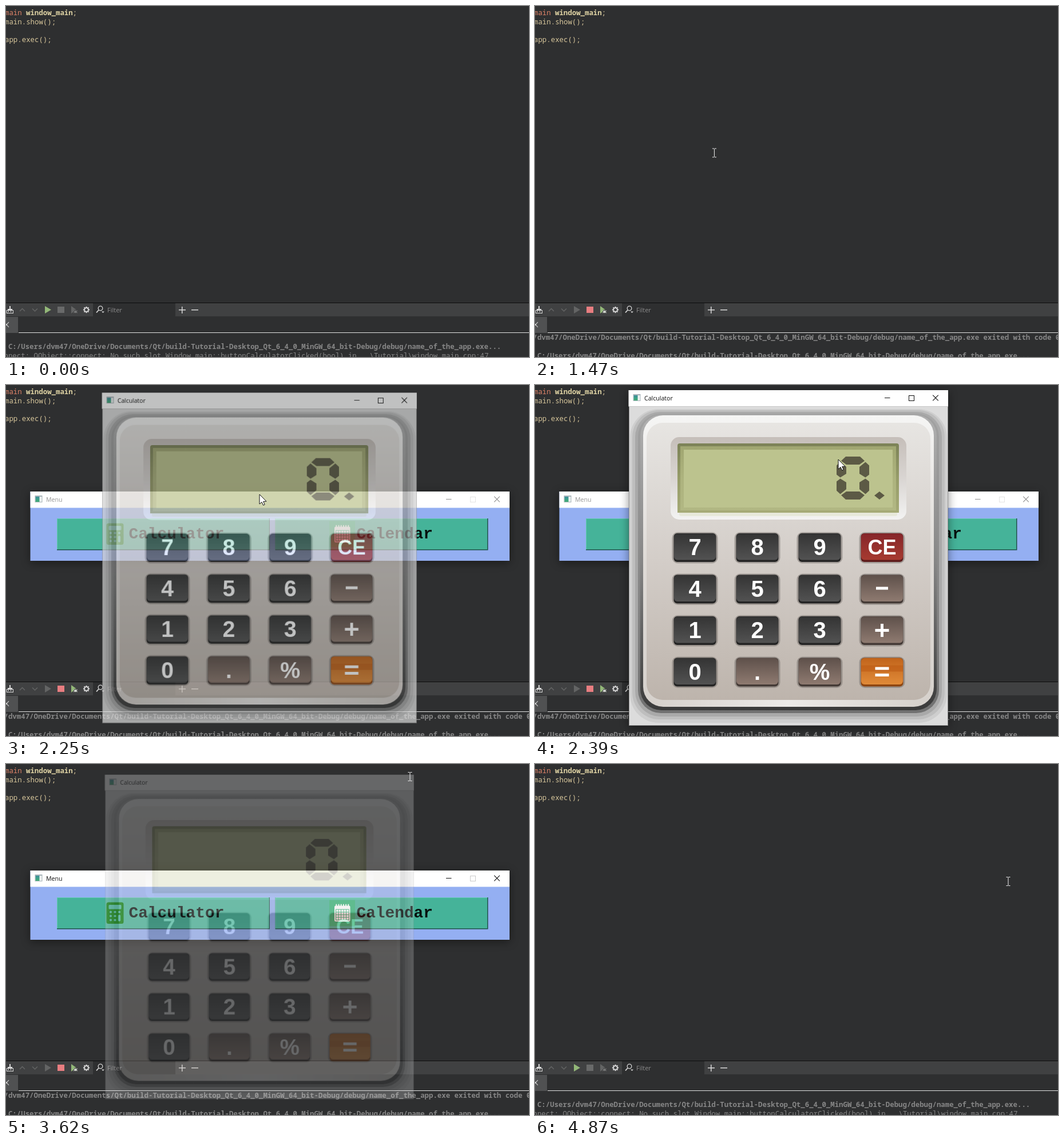
Recreate the animation shown at these times as an HTML page with a canvas. Size 914 by 613 pixels, loop 5 s.

```html
<!DOCTYPE html>
<html lang="en">
<head>
<meta charset="utf-8">
<title>Menu and calculator</title>
<style>
html, body { margin: 0; width: 100%; height: 100%; overflow: hidden; background: #2e2f30; }
canvas { display: block; }
</style>
</head>
<body>
<canvas id="stage" width="914" height="613"></canvas>
<script>
const W = 914, H = 613, LOOP = 5000;
const screen = document.getElementById('stage').getContext('2d');
const buffer = document.createElement('canvas');
buffer.width = W;
buffer.height = H;
const layer = buffer.getContext('2d');
let g = screen;

const MONO = '12.38px "Noto Sans Mono", monospace';
const UI = '"Open Sans", "Noto Sans", sans-serif';
const CHAR = 7.43;

// Bursts of motion: start time and step length
const BURSTS = [[0, 120], [120, 90], [1260, 71], [1830, 70], [2390, 70], [3280, 68], [3830, 70], [4520, 70]];

// time, x, y
const POINTER = [
  [120, 136, 546], [390, 222, 536], [1259, 222, 536], [1260, 293, 276], [1420, 316, 254],
  [1830, 325, 249], [2010, 327, 248], [2250, 443, 191], [2390, 530, 130], [2880, 709, 15],
  [3280, 709, 15], [3620, 706, 22], [3756, 708, 44], [3830, 716, 62], [4320, 861, 201],
  [4520, 861, 201], [4870, 827, 205]
];

// time, scale, opacity
const MENU_FADE = [
  [1402, .93, 0], [1473, .962, .35], [1544, .985, .7], [1615, .997, .93], [1686, 1, 1],
  [4520, 1, 1], [4590, .995, .85], [4660, .983, .55], [4730, .967, .27], [4800, .953, .08], [4870, .94, 0]
];
const CALC_FADE = [
  [2110, .93, 0], [2180, .962, .38], [2250, .985, .7], [2320, .997, .93], [2390, 1, 1],
  [3416, 1, 1], [3484, .993, .82], [3552, .982, .53], [3620, .967, .27], [3688, .953, .08], [3756, .94, 0]
];

function sample(keys, t) {
  if (t <= keys[0][0]) return keys[0].slice(1);
  for (let i = 1; i < keys.length; i++) {
    const a = keys[i - 1], b = keys[i];
    if (t <= b[0]) {
      const u = (t - a[0]) / (b[0] - a[0]);
      return a.slice(1).map((v, k) => v + (b[k + 1] - v) * u);
    }
  }
  return keys[keys.length - 1].slice(1);
}

function stepTime(t) {
  const [start, step] = BURSTS.filter(b => b[0] <= t).pop();
  return start + Math.floor((t - start) / step) * step;
}

function rect(x, y, x2, y2, color) {
  g.fillStyle = color;
  g.fillRect(x, y, x2 - x, y2 - y);
}

function round(x, y, x2, y2, r, color) {
  g.fillStyle = color;
  g.beginPath();
  g.roundRect(x, y, x2 - x, y2 - y, r);
  g.fill();
}

function box(x, y, x2, y2, color) {
  g.strokeStyle = color;
  g.lineWidth = 1;
  g.strokeRect(x + .5, y + .5, x2 - x - 1, y2 - y - 1);
}

function disc(x, y, r, color) {
  g.fillStyle = color;
  g.beginPath();
  g.arc(x, y, r, 0, 7);
  g.fill();
}

function poly(points, color) {
  g.fillStyle = color;
  g.beginPath();
  points.forEach(p => g.lineTo(...p));
  g.closePath();
  g.fill();
}

function line(points, color, width = 1) {
  g.strokeStyle = color;
  g.lineWidth = width;
  g.beginPath();
  points.forEach((p, i) => i ? g.lineTo(...p) : g.moveTo(...p));
  g.stroke();
}

function text(str, x, y, font, color, align = 'left') {
  g.font = font;
  g.fillStyle = color;
  g.textAlign = align;
  g.fillText(str, x, y);
}

function grad(y, y2, ...colors) {
  const fill = g.createLinearGradient(0, y, 0, y2);
  colors.forEach((c, i) => fill.addColorStop(i / (colors.length - 1), c));
  return fill;
}

// ---- Code editor and output pane ----

function editor() {
  rect(0, 0, W, H, '#2e2f30');
  text('main', -2, 16, MONO, '#e08468');
  text('window_main', 35, 16, 'bold ' + MONO, '#dfd3a4');
  text(';', 35 + 11 * 7.4, 16, MONO, '#d6c59a');
  text('main.show();', -2, 32, MONO, '#d6c59a');
  text('app.exec();', -2, 63, MONO, '#d6c59a');
}

function toolbar(running) {
  const dim = '#636464', green = '#93b878', light = '#d8d8d8';
  rect(0, 518, W, 519, '#0c0c0c');
  rect(0, 519, W, 542, '#404142');
  rect(152, 519, 296, 542, '#2e2f30');

  rect(6, 524, 8, 530, light);
  rect(3, 529, 11, 531, light);
  box(1, 531, 13, 537, light);
  rect(4, 532, 5, 535, light);
  rect(8, 532, 9, 535, light);
  line([[24, 533], [28.5, 528.5], [33, 533]], dim, 1.5);
  line([[46, 528.5], [50.5, 533], [55, 528.5]], dim, 1.5);

  poly([[68, 524], [79, 530.5], [68, 537]], running ? dim : green);
  rect(90, 525, 102, 536, running ? '#e87d80' : '#696a6a');
  poly([[114, 524], [123, 530.5], [114, 537]], running ? green : dim);
  disc(121.5, 534, 3.5, '#404142');
  disc(121.5, 534, 2.3, running ? '#cfd2cc' : '#747575');
  line([[118, 532], [125, 536]], running ? '#cfd2cc' : '#747575');
  line([[118, 536], [125, 532]], running ? '#cfd2cc' : '#747575');

  for (let i = 0; i < 8; i++) {
    const c = Math.cos(i * Math.PI / 4), s = Math.sin(i * Math.PI / 4);
    line([[140.5 + 3.5 * c, 530.5 + 3.5 * s], [140.5 + 5.6 * c, 530.5 + 5.6 * s]], light, 2);
  }
  g.strokeStyle = light;
  g.lineWidth = 1.8;
  g.beginPath();
  g.arc(140.5, 530.5, 3.4, 0, 7);
  g.stroke();

  g.lineWidth = 1.3;
  g.beginPath();
  g.arc(165, 528, 3.8, 0, 7);
  g.stroke();
  line([[162, 531], [158, 535.5]], light, 1.8);
  poly([[167, 533.5], [172, 533.5], [169.5, 536]], light);
  text('Filter', 177, 535, '11px ' + UI, '#8c8c8c');
  rect(302, 530, 314, 531.5, light);
  rect(307, 525, 308.5, 537, light);
  rect(324, 530, 336, 531.5, light);

  rect(0, 543, 21, 571, '#505152');
  line([[-3, 552], [5, 561]], light, 1.1);
  line([[5, 552], [-3, 561]], light, 1.1);
  rect(22, 570, W, 571, '#e2e2e2');
}

function output(state) {
  const gray = '#868686', bold = 'bold ' + MONO, left = -3.5;
  const tail = 'dvm47/OneDrive/Documents/Qt/build-Tutorial-Desktop_Qt_6_4_0_MinGW_64_bit-Debug/debug/name_of_the_app.exe';
  const started = y => text('C:/Users/' + tail + '...', left + CHAR, y, bold, gray);
  const exited = y => text('/' + tail + ' exited with code 0', left, y, bold, gray);
  const warning = y => {
    text('nnect: QObject::connect: No such slot Window_main::buttonCalculatorClicked(bool) in ', left, y, MONO, gray);
    const x = left + 84 * CHAR;
    text('..\\Tutorial\\window_main.cpp:47', x, y, MONO, gray);
    rect(x, y + 1, x + 30 * CHAR, y + 2, gray);
  };
  if (state === 0) { started(599); warning(615); }
  if (state === 1) { warning(583); exited(599); }
  if (state === 2) { exited(583); started(615); }
}

// ---- Application windows ----

function titleBar(x, y, x2, title, o) {
  const mid = y + 13.5, ink = o.active ? '#111' : '#8e8e8e';
  rect(x, y, x2, y + 28.5, '#fff');
  rect(x + 8, y + 7, x + 21, y + 19, '#a9b4ba');
  rect(x + 9, y + 9, x + 20, y + 18, '#eef3f2');
  rect(x + 9, y + 9, x + 16, y + 18, grad(y + 9, y + 18, '#3c8f9c', '#3fae74'));
  text(title, x + 27.5, y + 17.8, '10.6px ' + UI, o.active ? '#111' : '#959595');
  if (o.closing) return;
  rect(x2 - 111, mid - .5, x2 - 101.5, mid + .5, ink);
  box(x2 - 69, mid - 4.5, x2 - 59, mid + 5.5, o.canMax ? ink : o.active ? '#cacaca' : '#e4e4e4');
  if (o.hot) rect(x2 - 42, y, x2, y + 28, '#e81123');
  const cross = o.hot ? '#fff' : ink, cx = x2 - 22, r = 4.8;
  line([[cx - r, mid - r], [cx + r, mid + r]], cross, 1.1);
  line([[cx - r, mid + r], [cx + r, mid - r]], cross, 1.1);
}

function menuButton(x, label, labelX) {
  const x2 = x + 372;
  rect(x, 233, x2, 288.5, '#1d5548');
  rect(x, 233, x2 - 1.5, 287, '#62c9b2');
  rect(x + 1, 234, x2 - 1.5, 287, '#45b399');
  text(label, labelX, 268, 'bold 27.8px "Liberation Mono", monospace', '#07110e');
}

function menu(o) {
  rect(42.5, 186, 880, 307, '#94aff2');
  titleBar(42.5, 186, 880, 'Menu', o);
  menuButton(89, 'Calculator', 214.5);
  menuButton(470.5, 'Calendar', 612.5);

  round(175.5, 241.5, 205.5, 279, 3.5, '#067a0b');
  round(179.5, 246, 201.5, 253.5, 1.5, '#45b399');
  for (let i = 0; i < 9; i++) disc(183 + i % 3 * 7.5, 258.5 + Math.floor(i / 3) * 7, 2.1, '#45b399');
  round(195.9, 263.5, 200.1, 274.6, 2, '#45b399');

  rect(565, 237.5, 610, 283, '#34b478');
  round(574, 247.5, 601.5, 275, 2, '#fff');
  for (let i = 0; i < 6; i++) round(576.3 + i * 4.2, 244.5, 578.3 + i * 4.2, 250, 1, '#fff');
  rect(576, 253.5, 599.5, 273, '#34b478');
  for (let i = 0; i < 20; i++) {
    const x = 577 + i % 5 * 4.5, y = 254.5 + Math.floor(i / 5) * 4.6;
    rect(x, y, x + 3.6, y + 3.7, '#fff');
  }
}

function zeroDigit(ink) {
  const cx = 555.5, cy = 162.5;
  for (const s of [-1, 1]) {
    const py = v => cy + s * v;
    poly([[535, py(30)], [543, py(37.5)], [568, py(37.5)], [576, py(30)], [567, py(23.5)], [544, py(23.5)]], ink);
    for (const d of [-1, 1]) {
      const px = v => cx + d * v;
      poly([[px(22), py(28)], [px(28.5), py(22)], [px(28.5), py(6)], [px(22), py(1)], [px(11.5), py(7.5)], [px(11.5), py(19.5)]], ink);
    }
  }
  poly([[593, 193], [602, 186], [611, 193], [602, 200]], ink);
}

const KEY_COLORS = {
  dark: ['#343434', '#525252', '#242424'],
  brown: ['#5f514b', '#8e7a70', '#443a36'],
  red: ['#86262a', '#a63a30', '#5d1b1b'],
  orange: ['#c2651c', '#e08a38', '#8e4510']
};

function key(label, col, row) {
  const cx = 279.5 + col * 109, cy = 284 + row * 72.5;
  const kind = label === 'CE' ? 'red' : label === '=' ? 'orange' : /\d/.test(label) ? 'dark' : 'brown';
  const [top, bottom, edge] = KEY_COLORS[kind];
  round(cx - 40, cy - 27, cx + 40, cy + 27.5, 10, 'rgba(105,98,94,.45)');
  round(cx - 37, cy - 25, cx + 37, cy + 25, 6, edge);
  round(cx - 36.5, cy - 24.5, cx + 36.5, cy + 21.5, 6, grad(cy - 24, cy + 21, top, bottom));
  if (kind === 'orange') rect(cx - 36.5, cy - 12, cx + 36.5, cy - 1, 'rgba(190,92,20,.6)');
  const bar = (y, h = 5) => rect(cx - 12, y, cx + 12, y + h, '#fff');
  if (label === '-') rect(cx - 10.5, cy - 4, cx + 10.5, cy + 1, '#fff');
  else if (label === '+') {
    bar(cy - 3);
    rect(cx - 2.5, cy - 12, cx + 2.5, cy + 11, '#fff');
  } else if (label === '=') {
    bar(cy - 9);
    bar(cy + 2.5);
  } else {
    const size = label === 'CE' ? 36 : 40;
    text(label, cx, cy + (size === 36 ? 11.5 : 13), `bold ${size}px "Liberation Sans", sans-serif`, '#fff', 'center');
  }
}

function calculator(o) {
  rect(164, 9, 722, 595, '#8f8f8f');
  rect(165, 38, 721, 594, '#dcdcdc');
  titleBar(163.5, 9, 722, 'Calculator', o);

  round(166, 42, 720, 590, 50, '#cecece');
  round(170, 44, 716, 584, 47, '#bebebe');
  round(175, 47, 711, 579, 44, '#a9a9a9');
  round(180, 50, 706, 573, 40, grad(50, 573, '#a2a2a2', '#8a8a8a', '#717171'));
  round(184, 52, 702, 568, 37, grad(52, 568, '#b0b0b0', '#858585', '#3a3a3a'));
  round(189, 53, 697, 562, 35, grad(53, 562, '#f5f5f4', '#dedad6', '#d6d1cc'));
  const gleam = g.createLinearGradient(210, 0, 676, 0);
  gleam.addColorStop(0, 'rgba(255,255,255,0)');
  gleam.addColorStop(.5, 'rgba(255,255,255,.55)');
  gleam.addColorStop(1, 'rgba(255,255,255,0)');
  rect(210, 549, 676, 562, gleam);
  round(195, 66, 691, 550, 28, grad(66, 550, '#e7e5e2', '#d3cdc8', '#bdb4ac'));

  round(237, 91, 649, 235, 15, grad(91, 235, '#c5beb9', '#d9d5d2', '#f3f3f2'));
  round(249, 102, 636, 223, 4, grad(102, 223, '#7c8257', '#969c69', '#a5aa76'));
  round(252, 219, 633, 229, 3, 'rgba(224,227,203,.55)');
  rect(249, 219, 636, 223, '#a5aa76');
  rect(254, 107, 631, 219, grad(107, 219, '#a0a671', '#adb37e', '#b1b783'));
  rect(260, 113, 625, 214, '#bcc38e');
  zeroDigit('#5c5a45');

  ['7', '8', '9', 'CE', '4', '5', '6', '-', '1', '2', '3', '+', '0', '.', '%', '=']
    .forEach((label, i) => key(label, i % 4, Math.floor(i / 4)));
}

// Paints a window as one group so it can fade and scale about its centre
function appWindow(draw, options, [x, y, x2, y2], [scale, alpha]) {
  if (alpha <= 0) return;
  layer.clearRect(0, 0, W, H);
  g = layer;
  draw(options);
  g = screen;
  const cx = (x + x2) / 2, cy = (y + y2) / 2;
  g.save();
  g.globalAlpha = alpha;
  g.translate(cx, cy);
  g.scale(scale, scale);
  g.translate(-cx, -cy);
  if (scale === 1) {
    g.shadowColor = 'rgba(0,0,0,.45)';
    g.shadowBlur = 16;
    g.shadowOffsetY = 3;
  }
  g.drawImage(buffer, 0, 0);
  g.restore();
}

// ---- Pointer ----

function arrow(x, y) {
  const points = [[0, 0], [0, 17], [4, 13.4], [6.6, 19], [9.2, 17.9], [6.7, 12.4], [12, 12.2]];
  const placed = points.map(([px, py]) => [x + px, y + py]);
  poly(placed, '#fff');
  line([...placed, placed[0]], '#111');
}

function beam(x, y) {
  rect(x - .5, y - 7, x + .5, y + 7, '#f2f2f2');
  for (const top of [y - 8, y + 7]) {
    rect(x - 3.5, top, x - .5, top + 1, '#f2f2f2');
    rect(x + .5, top, x + 3.5, top + 1, '#f2f2f2');
  }
}

function render(now) {
  const t = stepTime(now % LOOP);
  const [px, py] = sample(POINTER, t);
  const overClose = (x2, y) => px >= x2 - 42 && px < x2 && py >= y && py < y + 28;
  const running = t >= 1260 && t < 4660;

  g = screen;
  editor();
  toolbar(running);
  output(!running ? 0 : t < 1400 ? 1 : 2);

  appWindow(menu, {
    active: t < 2110 || t >= 3416,
    hot: overClose(880, 186),
    closing: t >= 4590
  }, [42.5, 186, 880, 307], sample(MENU_FADE, t));

  appWindow(calculator, {
    active: true,
    canMax: true,
    hot: overClose(722, 9),
    closing: t >= 3416
  }, [164, 9, 722, 595], sample(CALC_FADE, t));

  if (t >= 120) {
    const onText = (t >= 390 && t < 1473) || (t >= 3484 && py < 186) || t >= 4590;
    (onText ? beam : arrow)(px, py);
  }
}

function tick() {
  render(performance.now());
  requestAnimationFrame(tick);
}
tick();
</script>
</body>
</html>
```
